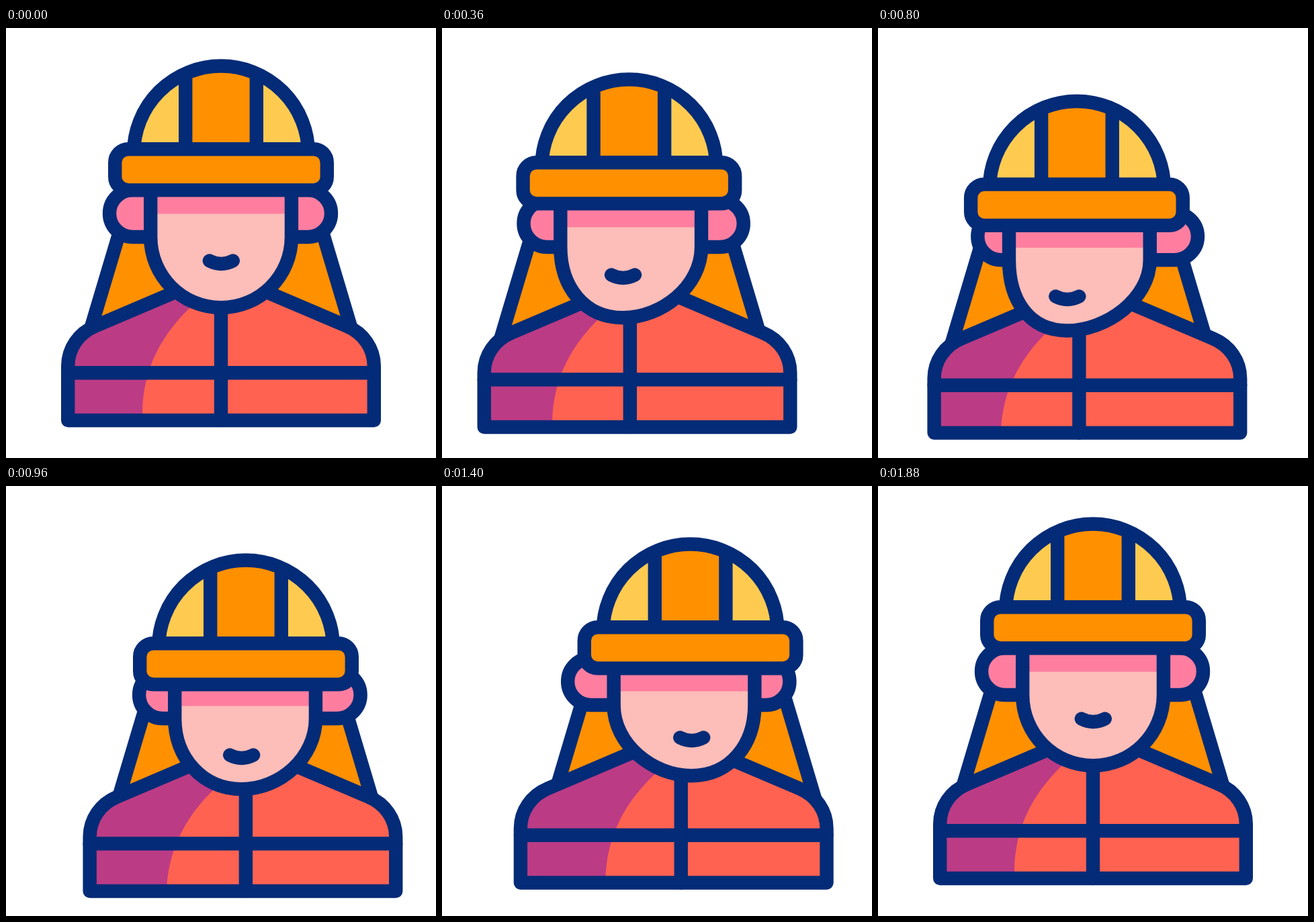
Recreate the animation shown at these times as an HTML page with a canvas. Size 640 by 640 pixels, loop 2440 ms.

```html
<!DOCTYPE html>
<html lang="en">
<head>
<meta charset="utf-8">
<title>Worker looking around</title>
<style>
html, body { margin: 0; width: 100%; height: 100%; overflow: hidden; background: #fff; }
canvas { display: block; width: 100vw; height: 100vh; }
</style>
</head>
<body>
<canvas id="stage" width="640" height="640"></canvas>
<script>
const ctx = document.getElementById('stage').getContext('2d');
const LOOP = 2440, STEP = 40, LAST = 1880, LINE = 20.4;
const NAVY = '#042b77', ORANGE = '#ff9000', YELLOW = '#fecb50', PINK = '#ff7ea0',
  SKIN = '#fdbdb8', RED = '#ff6250', PLUM = '#bc3b85';

// Sway: rest -> left -> right -> rest, eased between the times
const sway = (times, left, right) => t => {
  const ts = [0, ...times], vs = [0, left, right, 0];
  for (let i = 0; i < 3; i++) {
    if (t < ts[i + 1]) {
      const p = (t - ts[i]) / (ts[i + 1] - ts[i]);
      return vs[i] + (vs[i + 1] - vs[i]) * p * p * (3 - 2 * p);
    }
  }
  return 0;
};

// Dip: smooth curve through a few heights, resting at both ends
const dip = (end, ...heights) => {
  const ts = [0, 360, 640, 960, 1120, 1400, end], vs = [0, ...heights, 0];
  const slope = i => i < 1 || i > 5 ? 0 : (vs[i + 1] - vs[i - 1]) / (ts[i + 1] - ts[i - 1]);
  return t => {
    if (t >= end) return 0;
    let i = 0;
    while (t >= ts[i + 1]) i++;
    const d = ts[i + 1] - ts[i], p = (t - ts[i]) / d, q = 1 - p;
    return (1 + 2 * p) * q * q * vs[i] + p * q * q * d * slope(i)
      + p * p * (3 - 2 * p) * vs[i + 1] - p * p * q * d * slope(i + 1);
  };
};

const X = {
  body: sway([580, 1121, 1655], -43.5, 53),
  earL: sway([580, 1121, 1665], -48, 69),
  earR: sway([580, 1121, 1665], -52, 69.5),
  zip: sway([600, 1140, 1660], -62, 71.5),
  face: sway([600, 1150, 1692], -60, 72.5),
  helmet: sway([605, 1165, 1715], -65, 81.5),
  mouth: sway([615, 1170, 1718], -81, 83)
};
const Y = {
  body: dip(1680, 10, 17, 19, 17, 6.5),
  face: dip(1720, 15, 31, 35, 32, 15),
  shadow: dip(1760, 20, 46, 51, 48, 29),
  helmet: dip(1760, 20, 47, 54, 51, 30),
  mouth: dip(1760, 21, 48, 54, 51, 28)
};

function at(x, y, draw) {
  ctx.save();
  ctx.translate(x, y);
  draw();
  ctx.restore();
}

function shape(d, fill, line = true) {
  const path = new Path2D(d);
  if (fill) {
    ctx.fillStyle = fill;
    ctx.fill(path);
  }
  if (line) ctx.stroke(path);
}

function rect(x, y, w, h, fill) {
  ctx.fillStyle = fill;
  ctx.fillRect(x, y, w, h);
}

const BODY = 'M92.2 584V503C92.2 477 108 454 133 443.6L300 372.5H340L507 443.6C532 454 547.8 477 547.8 503V584Z';
const SHADE = 'M203 700V574C203 508 232 452 285 406L320 370H-200V700Z';
const HAIR = 'M188 240L122.4 460H517.6L452 240Z';

function drawBody(t) {
  const bx = X.body(t), by = Y.body(t), fx = X.face(t), fy = Y.face(t);
  at(bx, by, () => {
    shape(BODY, RED, false);
    ctx.save();
    ctx.clip(new Path2D(BODY));
    at(fx - bx, fy - by, () => shape(SHADE, PLUM, false));
    ctx.restore();
    shape('M92.2 513.2H547.8');
    at(X.zip(t) - bx, 0, () => shape('M320 400V584'));
    shape(BODY);
  });
}

function drawFace(t) {
  const fx = X.face(t), fy = Y.face(t);
  const l = 215.2 + fx, r = 424.9 + fx, c = 320 + X.mouth(t);
  const top = 215 + fy, side = 311.2 + fy, chin = 416.2 + fy;
  const d = `M${l} ${top}V${side}C${l} ${side + 58} ${c - 58} ${chin} ${c} ${chin}` +
    `C${c + 58} ${chin} ${r} ${side + 58} ${r} ${side}V${top}Z`;
  shape(d, SKIN, false);
  rect(l, top, r - l, 276.5 + Y.shadow(t) - top, PINK);
  shape(d);
}

function drawHelmet() {
  const dome = 'M190 186.5A130 130 0 0 1 450 186.5Z';
  shape(dome, YELLOW, false);
  ctx.save();
  ctx.clip(new Path2D(dome));
  rect(267.2, 50, 105.6, 136, ORANGE);
  ctx.restore();
  shape('M267.2 72V180M372.8 72V180');
  shape(dome);
  const brim = new Path2D();
  brim.roundRect(162.2, 180.2, 315.6, 61.2, 20);
  ctx.fillStyle = ORANGE;
  ctx.fill(brim);
  ctx.stroke(brim);
}

function draw(t) {
  rect(0, 0, 640, 640, '#fff');
  ctx.strokeStyle = NAVY;
  ctx.lineWidth = LINE;
  ctx.lineJoin = ctx.lineCap = 'round';
  const fy = Y.face(t);
  at(X.face(t), fy, () => shape(HAIR, ORANGE));
  at(X.earL(t), fy, () => shape('M235 311H189A35 35 0 0 1 189 241H235', PINK));
  at(X.earR(t), fy, () => shape('M403 311H449A35 35 0 0 0 449 241H403', PINK));
  drawBody(t);
  drawFace(t);
  at(X.helmet(t), Y.helmet(t), drawHelmet);
  at(X.mouth(t), Y.mouth(t), () => shape('M302.8 346.5Q320.3 355.5 337.8 346.5'));
}

const start = performance.now();
function tick() {
  const t = (performance.now() - start) % LOOP;
  draw(Math.min(Math.floor(t / STEP) * STEP, LAST));
  requestAnimationFrame(tick);
}
tick();
</script>
</body>
</html>
```
